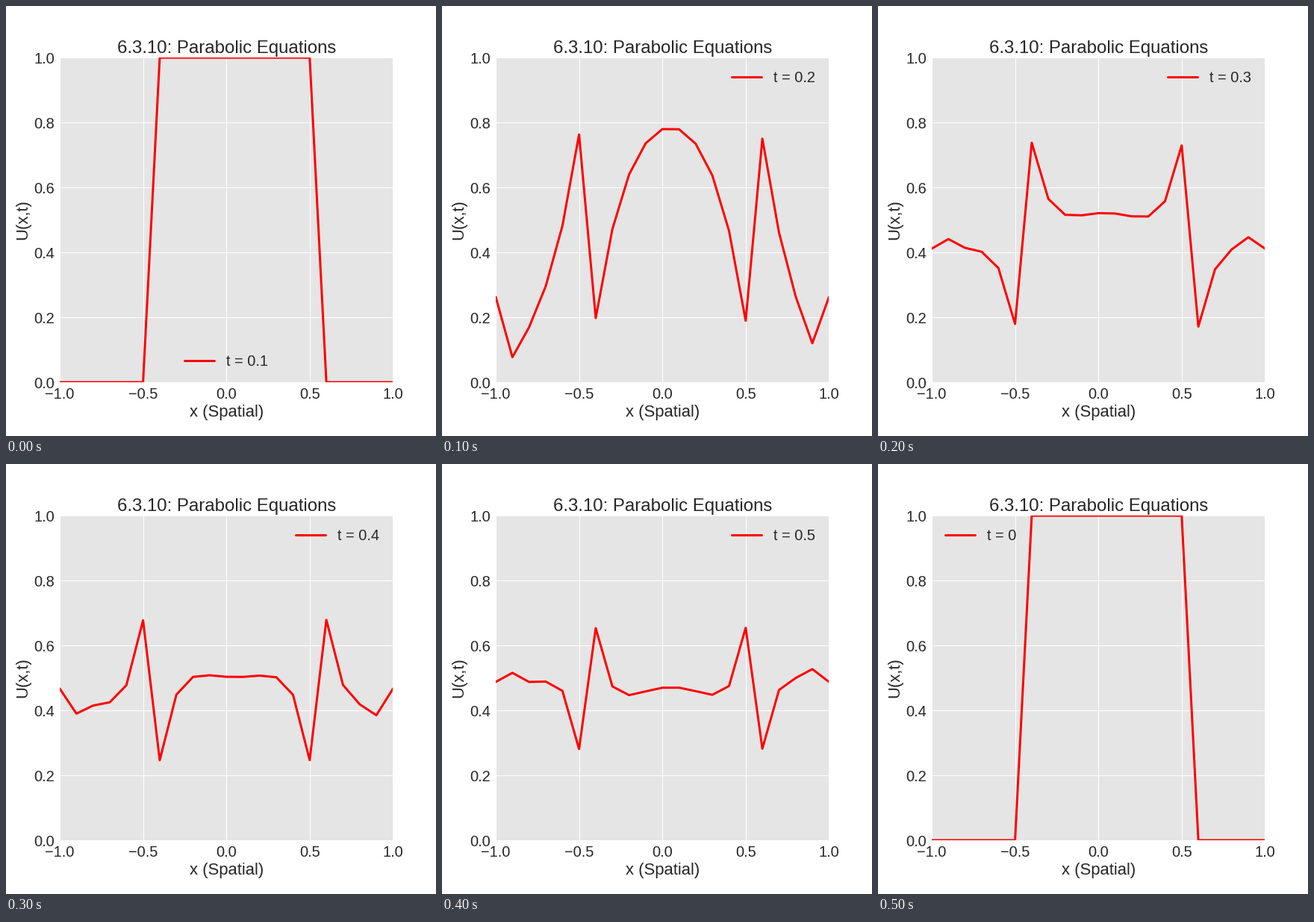
A matplotlib script that plays this animation: 576x576 px, repeating every 600 ms.

```python
import numpy as np
import matplotlib.pyplot as plt
from matplotlib.animation import FuncAnimation

plt.rcParams.update({
    "font.family": "Liberation Sans",
    "text.color": "0.15",
    "axes.labelcolor": "0.15",
    "xtick.color": "0.15",
    "ytick.color": "0.15",
    "axes.facecolor": "#E5E5E5",
    "axes.linewidth": 0,
    "axes.axisbelow": True,
    "axes.grid": True,
    "grid.color": "white",
    "grid.linewidth": 1,
    "axes.titlesize": 24,
    "axes.labelsize": 22,
    "xtick.labelsize": 20,
    "ytick.labelsize": 20,
    "xtick.major.size": 0,
    "ytick.major.size": 0,
    "xtick.major.pad": 7,
    "ytick.major.pad": 7,
    "legend.fontsize": 20,
    "legend.frameon": False,
    "lines.solid_capstyle": "round",
})

H = K = 0.1
MU = K / H**2
STEPS = 5
x = np.linspace(-1, 1, 21)


def edge_value(t):
    """Exact Fourier series solution at x = -1 and x = 1."""
    l = np.arange(40)
    w = np.pi * (2 * l + 1)
    return 0.5 + 2 * np.sum((-1.0)**l * np.cos(w) * np.exp(-w**2 * t) / w)


def crank_nicolson():
    """Return the profile at every time step, starting from a square pulse."""
    size = len(x)
    coupling = np.eye(size, k=1) + np.eye(size, k=-1)
    implicit = (1 + MU) * np.eye(size) - MU / 2 * coupling
    explicit = (1 - MU) * np.eye(size) + MU / 2 * coupling
    for m in (implicit, explicit):
        m[[0, -1]] = np.eye(size)[[0, -1]]

    u = (np.abs(x - 0.05) < 0.5).astype(float)
    history = [u]
    for n in range(1, STEPS):
        # the edges lag one step behind the interior
        u = np.linalg.solve(implicit, explicit @ u)
        u[[0, -1]] = edge_value(n * K)
        history.append(u)
    return history


profiles = crank_nicolson()

fig, ax = plt.subplots(figsize=(8, 8), dpi=72, facecolor="white")
fig.subplots_adjust(left=0.125, right=0.9, bottom=0.125, top=0.88)
ax.set(xlim=(-1, 1), ylim=(0, 1), xticks=np.linspace(-1, 1, 5),
       xlabel="x (Spatial)", ylabel="U(x,t)",
       title="6.3.10: Parabolic Equations")
line, = ax.plot(x, profiles[0], color="red", lw=3)


def update(n):
    if n == STEPS:
        step, label, loc = 0, "t = 0", "upper left"
    else:
        step, label = n, f"t = {(n + 1) * K:.1f}"
        loc = "upper right" if n else "lower center"
    line.set_ydata(profiles[step])
    line.set_label(label)
    return line, ax.legend(loc=loc)


anim = FuncAnimation(fig, update, frames=STEPS + 1, interval=100, repeat=True)
plt.show()
```
